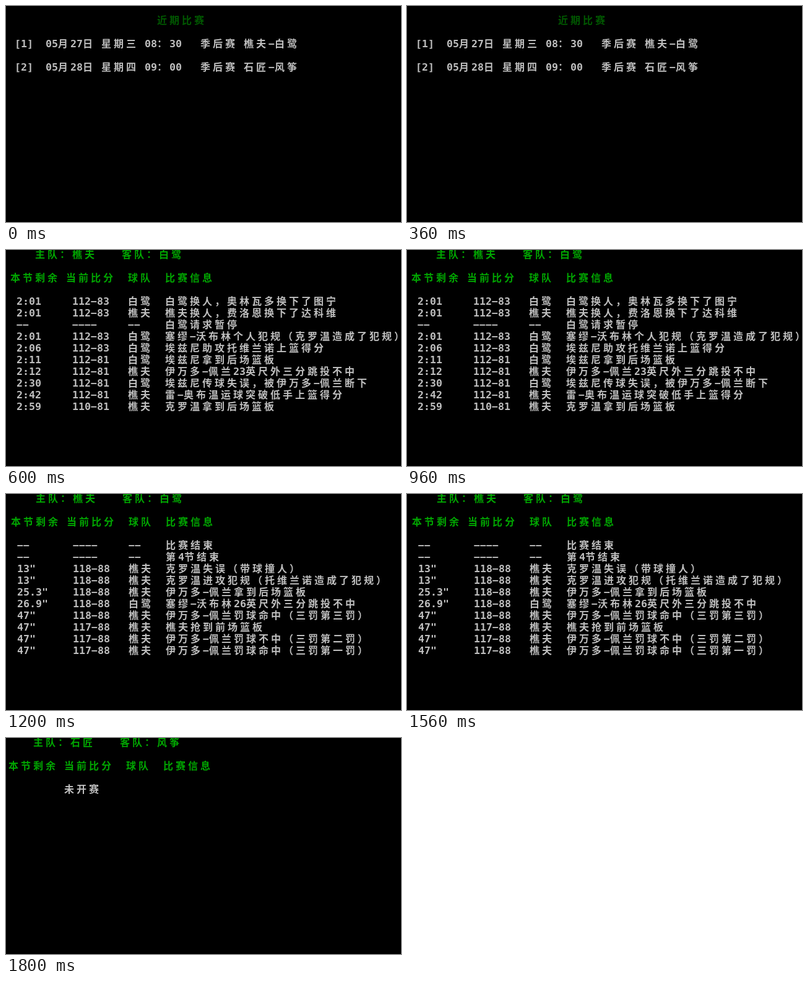
Animation of 638 by 351 pixels, one loop 2400 ms. Source, as an HTML page:

```html
<!DOCTYPE html>
<html lang="zh-CN">
<head>
<meta charset="utf-8">
<title>比赛文字直播</title>
<style>
  html, body { margin: 0; width: 100%; height: 100%; overflow: hidden; background: #000; }
  svg { display: block; width: 638px; height: 351px; }
  text {
    font: 700 16px "DejaVu Sans Mono", "Noto Sans CJK SC", "Noto Sans CJK", monospace;
    white-space: pre;
    fill: #bfbfbf;
  }
  .narrow { font-size: 16.6px; }
  .head { fill: #00a600; }
  .title { fill: #005800; }
</style>
</head>
<body>
<svg id="stage" viewBox="0 0 638 351"></svg>
<script>
const NS = 'http://www.w3.org/2000/svg';
const CELL = 10, ROW = 19, HOLD = 600;
const RUNS = /[\x20-\x7e−]+|[^\x20-\x7e−]+/g;
const stage = document.getElementById('stage');

const HOME = '樵夫', AWAY = '白鹭';
const COLUMNS = '本节剩余 当前比分  球队  比赛信息';

function add(parent, name, attrs = {}) {
  const node = document.createElementNS(NS, name);
  for (const key in attrs) node.setAttribute(key, attrs[key]);
  parent.append(node);
  return node;
}

// Each character sits on the terminal grid; wide ones take two cells.
function addLine(group, str, left, baseline, style) {
  const text = add(group, 'text', { y: baseline, class: style });
  let x = left;
  for (const run of str.replace(/-/g, '−').match(RUNS)) {
    const narrow = /[\x20-\x7e−]/.test(run);
    const step = narrow ? CELL : CELL * 2;
    const xs = [...run].map((_, i) => x + i * step);
    const span = add(text, 'tspan', { x: xs.join(' '), class: narrow ? 'narrow' : 'wide' });
    span.textContent = run;
    x += run.length * step;
  }
}

function addScreen(left, top, lines) {
  const group = add(stage, 'g');
  lines.forEach(([str, style = 'body'], row) => {
    if (str) addLine(group, str, left, top + row * ROW, style);
  });
  return group;
}

const header = (home, away) => [
  [`    主队：${home}    客队：${away}`, 'head'], [''], [COLUMNS, 'head'], ['']
];

const play = (time, score, team, info) =>
  [' ' + time.padEnd(9) + score.padEnd(9) + team + (team === '--' ? '    ' : '  ') + info];

const screens = [
  addScreen(14, 29, [
    [' '.repeat(23) + '近期比赛', 'title'], [''],
    [`[1]  05月27日 星期三 08：30   季后赛 ${HOME}-${AWAY}`], [''],
    ['[2]  05月28日 星期四 09：00   季后赛 石匠-风筝']
  ]),
  addScreen(7, 13, [
    ...header(HOME, AWAY),
    play('2:01', '112-83', AWAY, `${AWAY}换人，奥林瓦多换下了图宁`),
    play('2:01', '112-83', HOME, `${HOME}换人，费洛恩换下了达科维`),
    play('--', '----', '--', `${AWAY}请求暂停`),
    play('2:01', '112-83', AWAY, '塞缪-沃布林个人犯规（克罗温造成了犯规）'),
    play('2:06', '112-83', AWAY, '埃兹尼助攻托维兰诺上篮得分'),
    play('2:11', '112-81', AWAY, '埃兹尼拿到后场篮板'),
    play('2:12', '112-81', HOME, '伊万多-佩兰23英尺外三分跳投不中'),
    play('2:30', '112-81', AWAY, '埃兹尼传球失误，被伊万多-佩兰断下'),
    play('2:42', '112-81', HOME, '雷-奥布温运球突破低手上篮得分'),
    play('2:59', '110-81', HOME, '克罗温拿到后场篮板')
  ]),
  addScreen(8, 13, [
    ...header(HOME, AWAY),
    play('--', '----', '--', '比赛结束'),
    play('--', '----', '--', '第4节结束'),
    play('13"', '118-88', HOME, '克罗温失误（带球撞人）'),
    play('13"', '118-88', HOME, '克罗温进攻犯规（托维兰诺造成了犯规）'),
    play('25.3"', '118-88', HOME, '伊万多-佩兰拿到后场篮板'),
    play('26.9"', '118-88', AWAY, '塞缪-沃布林26英尺外三分跳投不中'),
    play('47"', '118-88', HOME, '伊万多-佩兰罚球命中（三罚第三罚）'),
    play('47"', '117-88', HOME, `${HOME}抢到前场篮板`),
    play('47"', '117-88', HOME, '伊万多-佩兰罚球不中（三罚第二罚）'),
    play('47"', '117-88', HOME, '伊万多-佩兰罚球命中（三罚第一罚）')
  ]),
  addScreen(4, 13, [
    ...header('石匠', '风筝'),
    [' '.repeat(9) + '未开赛']
  ])
];

function render(ms) {
  const current = Math.floor(ms / HOLD) % screens.length;
  screens.forEach((group, i) => {
    group.setAttribute('visibility', i === current ? 'visible' : 'hidden');
  });
}

const start = performance.now();
function tick() {
  render(performance.now() - start);
  requestAnimationFrame(tick);
}
tick();
</script>
</body>
</html>
```
